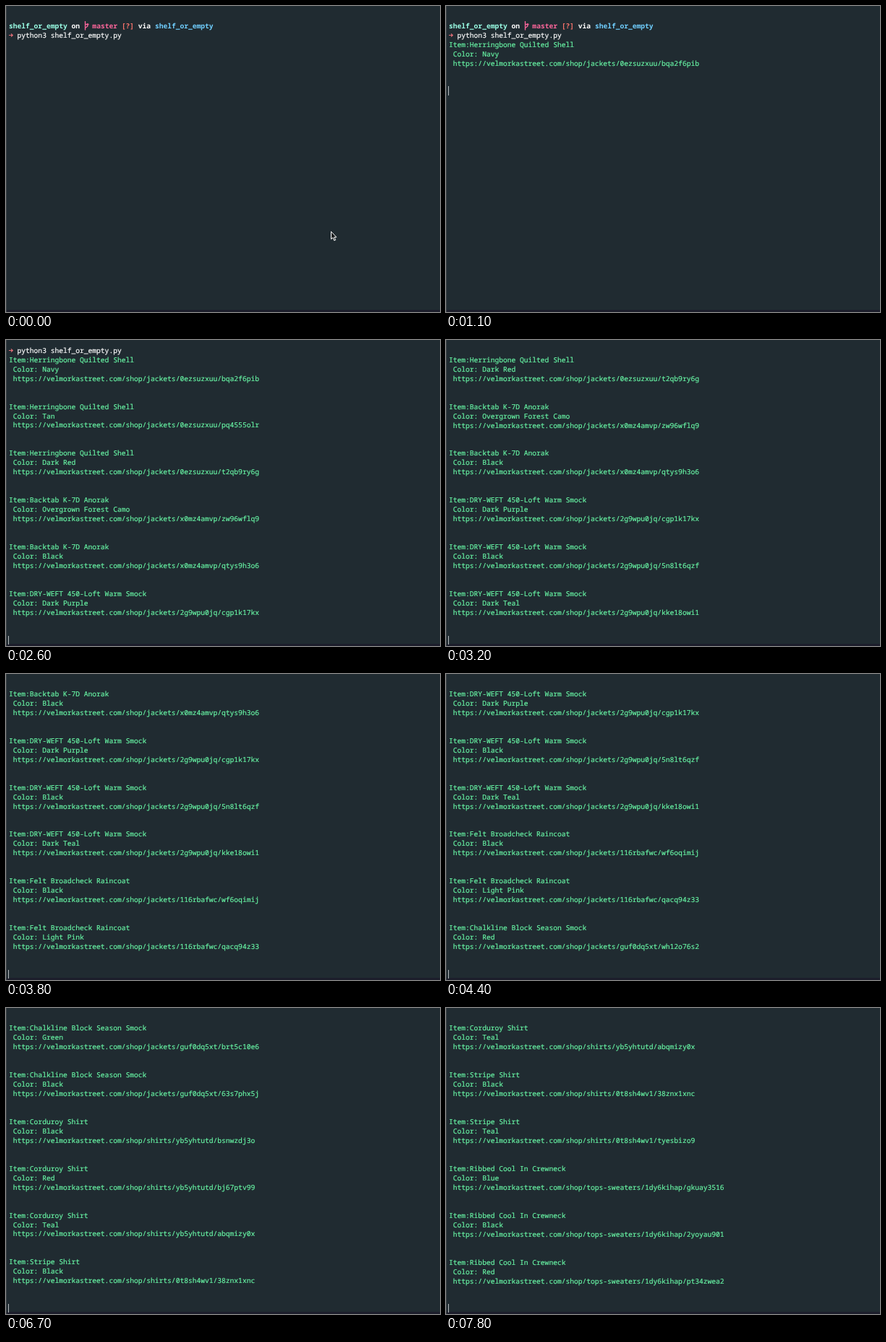
Write an HTML page that moves like this. It is 600 by 424 pixels and loops after 7900 ms.

```html
<!DOCTYPE html>
<html lang="en">
<head>
<meta charset="utf-8">
<title>Stock check in a terminal</title>
<style>
html, body { margin: 0; width: 100%; height: 100%; overflow: hidden; background: #202b31; }
#stage { position: relative; width: 600px; height: 424px; overflow: hidden; background: #202b31; }
#stage::before { content: ""; position: absolute; inset: 421px 0 0 0; background: #1c1e2b; }
#stage::after { content: ""; position: absolute; inset: 0 auto 0 0; width: 1px; background: #3c4245; }
#view { position: absolute; left: 0; top: 7.6px; width: 600px; height: 416.4px; overflow: hidden; }
#log {
  position: absolute; left: 4px; top: 0; margin: 0; color: #fff;
  font: 500 9.62px/12.98px "Noto Sans Mono", "DejaVu Sans Mono", monospace;
  font-variant-ligatures: none; text-rendering: geometricPrecision;
  -webkit-text-stroke: .2px;
}
#log b { -webkit-text-stroke: 0; }
#log svg { width: 1ch; height: 12.98px; vertical-align: top; overflow: visible; }
#items { color: #67f4a4; }
#caret { position: absolute; left: -1px; width: 1px; height: 12.5px; background: #b4babd; }
#mouse { position: absolute; left: 448px; top: 311px; }
.dir { color: #9affe6; }
.branch { color: #fc669b; }
.flag { color: #fc746d; }
.env { color: #70cfff; }
</style>
</head>
<body>
<div id="stage">
  <div id="view"><pre id="log">
<br><b><span class="dir">shelf_or_empty</span> on <svg fill="none" stroke="#fc669b" stroke-width="1.3"><path d="M1.5 0V12.5M1.5 9.5L4.8 7V3M1.5 4.5H6.5"/></svg> <span class="branch">master</span> <span class="flag">[?]</span> via <span class="env">shelf_or_empty</span></b>
<svg fill="none" stroke="#e8707a" stroke-width="1.2"><path d="M0 6.5H5M3 4.3L5.2 6.5L3 8.7"/></svg> python3 shelf_or_empty.py
<span id="items"></span><i id="caret"></i></pre></div>
  <svg id="mouse" width="12" height="17"><path d="M1.5 1.5V12L4 9.9L5.8 14L7.6 13.2L5.8 9.3H8.8Z" fill="#15191c" stroke="#fff"/></svg>
</div>
<script>
const LOOP = 7900, ROW = 12.98, LAST_ROW = 31, FIRST_ROW = 3, ITEM_ROWS = 5;

const products = [
  ["Herringbone Quilted Shell", "jackets", "Navy,Tan,Dark Red"],
  ["Backtab K-7D Anorak", "jackets", "Overgrown Forest Camo,Black"],
  ["DRY-WEFT 450-Loft Warm Smock", "jackets", "Dark Purple,Black,Dark Teal"],
  ["Felt Broadcheck Raincoat", "jackets", "Black,Light Pink"],
  ["Chalkline Block Season Smock", "jackets", "Red,Green,Black"],
  ["Corduroy Shirt", "shirts", "Black,Red,Teal"],
  ["Stripe Shirt", "shirts", "Black,Teal"],
  ["Ribbed Cool In Crewneck", "tops-sweaters", "Blue,Black,Red"]
];

// When each item is printed, in ms
const times = [900, 1300, 1700, 2000, 2300, 2500, 2900, 3200, 3500, 3700, 4200,
  4600, 5000, 5800, 6100, 6400, 6600, 6900, 7200, 7500, 7700];

let seed = 41;
const random = () => (seed = seed * 16807 % 2147483647) / 2147483647;
const code = () => Array.from({ length: 9 }, () => Math.floor(random() * 36).toString(36)).join("");

const items = products.flatMap(([name, section, colors]) => {
  const path = `https://velmorkastreet.com/shop/${section}/${code()}/`;
  return colors.split(",").map(color => `Item:${name}\n Color: ${color}\n ${path}${code()}\n\n\n`);
});

const [log, list, caret, mouse] = ["log", "items", "caret", "mouse"].map(id => document.getElementById(id));
const show = (element, visible) => element.style.display = visible ? "block" : "none";
let shown = -1;

function draw(now) {
  const t = now % LOOP;
  const count = times.filter(time => time <= t).length;
  if (count !== shown) {
    const row = FIRST_ROW + count * ITEM_ROWS;
    list.textContent = items.slice(0, count).join("");
    caret.style.top = row * ROW + "px";
    log.style.top = -Math.max(0, row - LAST_ROW) * ROW + "px";
    shown = count;
  }
  show(caret, t >= 900 || (t >= 200 && t < 700));
  show(mouse, t < 200);
  requestAnimationFrame(draw);
}
draw(performance.now());
</script>
</body>
</html>
```
